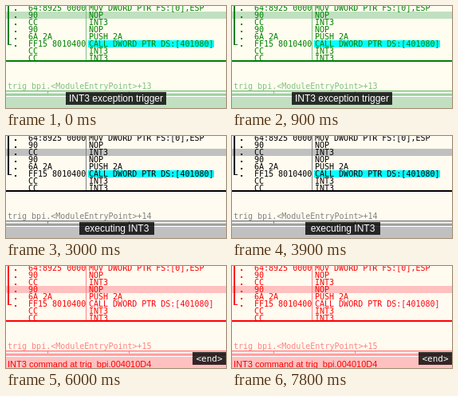
An HTML page with a canvas for the animation above (9 s loop, 276x128 px).

```html
<!DOCTYPE html>
<html lang="en">
<head>
<meta charset="utf-8">
<title>Debugger</title>
<style>
html, body { margin: 0; width: 276px; height: 128px; overflow: hidden; }
canvas { display: block; }
</style>
</head>
<body>
<canvas id="stage" width="276" height="128"></canvas>
<script>
const ctx = document.getElementById('stage').getContext('2d');
const MONO = '"DejaVu Sans Mono", monospace';
const SANS = '"Liberation Sans", Arial, sans-serif';
const PAPER = '#fffbf0', INK = '#000', GRAY = '#c0c0c0', DIM = '#808080';
const ROW = 9, TOP = -2, SPLIT = 100;

const code = [
  ['64:8925 00000000', 'MOV DWORD PTR FS:[0],ESP'],
  ['90', 'NOP'],
  ['CC', 'INT3'],
  ['90', 'NOP'],
  ['6A 2A', 'PUSH 2A'],
  ['FF15 80104000', 'CALL DWORD PTR DS:[401080]'],
  ['CC', 'INT3'],
  ['CC', 'INT3']
];

// box: left edge and width of the caption
const steps = [
  { end: 1500, row: 1, tint: '#008000', note: 'INT3 exception trigger', box: [75, 126] },
  { end: 3000, row: 1 },
  { end: 4500, row: 2, note: 'executing INT3', box: [92, 94] },
  { end: 6000, row: 3, status: true, note: 'exception triggered (on next EIP)', box: [47, 183] },
  { end: 9000, row: 3, status: true, tint: '#ff0000', note: '<end>', box: [234, 42], font: '11px ' + MONO }
];

function rect(color, x, y, w, h) {
  ctx.fillStyle = color;
  ctx.fillRect(x, y, w, h);
}

function text(str, x, y, color, font = '10px ' + MONO) {
  ctx.font = font;
  ctx.fillStyle = color;
  ctx.fillText(str, x, y);
}

function listing(row) {
  rect(GRAY, 0, TOP + row * ROW, 276, ROW);
  code.forEach(([bytes], i) => {
    const y = TOP + i * ROW + 8;
    if (i < 6) rect(INK, 11, y - 2, 2, 2);
    text(bytes, 28, y, INK);
  });
  // The command column covers the end of long byte strings.
  rect(PAPER, SPLIT, 0, 176, 68);
  rect(GRAY, SPLIT, TOP + row * ROW, 176, ROW);
  rect('#00ffff', SPLIT + 3, TOP + 5 * ROW, 158, ROW);
  code.forEach(([, command], i) => text(command, SPLIT + 4, TOP + i * ROW + 8, INK));
  rect(INK, 2, 0, 2, 49);
  rect(INK, 2, 48, 5, 1);
  rect(DIM, SPLIT, 0, 1, 68);
}

function footer(row, status) {
  rect(PAPER, 0, 68, 276, 38);
  rect(INK, 0, 68, 276, 2);
  text('trig_bpi.<ModuleEntryPoint>+' + (12 + row), 2, 104, DIM);
  rect(GRAY, 0, 106, 276, 22);
  for (const y of [106, 111]) {
    rect(DIM, 0, y, 276, 1);
    rect('#fff', 0, y + 2, 276, 1);
  }
  for (const x of [52, 154]) rect(DIM, x, 107, 1, 3);
  if (status) text('INT3 command at trig_bpi.004010D4', 2, 127, INK, '11px ' + SANS);
}

function caption({ note, box: [x, w], font = '12px ' + SANS }) {
  rect('rgba(0, 0, 0, 0.8)', x, 108, w, 16);
  ctx.textAlign = 'center';
  text(note, x + w / 2, 120, '#fff', font);
  ctx.textAlign = 'left';
}

function draw(now) {
  const time = now % 9000;
  const step = steps.find(s => time < s.end);
  rect(PAPER, 0, 0, 276, 128);
  listing(step.row);
  footer(step.row, step.status);
  if (step.tint) {
    ctx.globalCompositeOperation = 'screen';
    rect(step.tint, 0, 0, 276, 128);
    ctx.globalCompositeOperation = 'source-over';
  }
  if (step.note) caption(step);
  requestAnimationFrame(() => draw(performance.now()));
}
draw(0);
</script>
</body>
</html>
```
